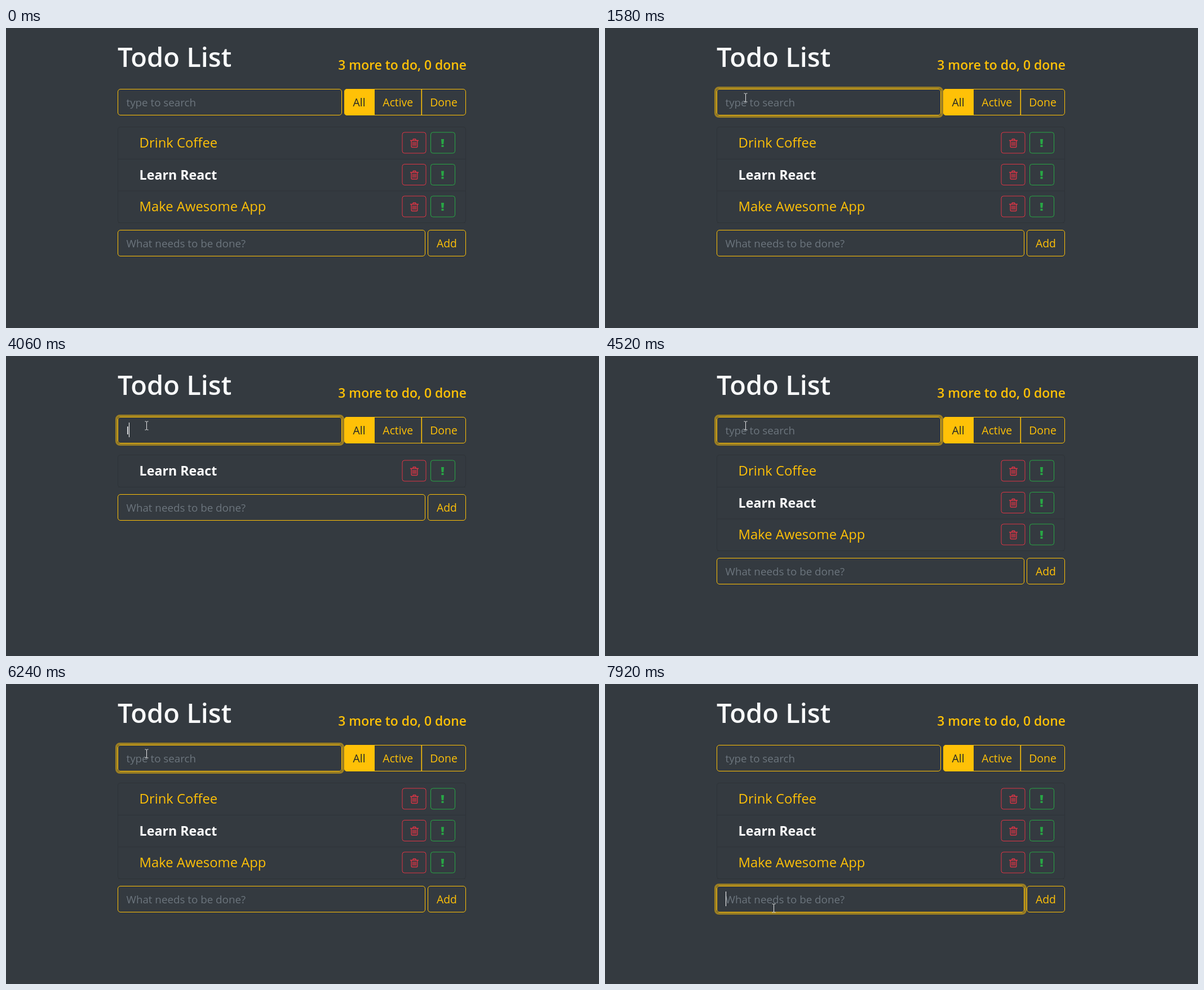
Recreate the animation shown at these times as an HTML page. Size 1052x532 px, loop 7.99 s.

```html
<!DOCTYPE html>
<html lang="en">
<head>
<meta charset="utf-8">
<title>Todo List</title>
<style>
html, body { margin: 0; width: 100%; height: 100%; overflow: hidden; background: #343a40; }
svg { display: block; width: 1052px; height: 532px; font: 18.8px "Open Sans", "Noto Sans", sans-serif; }
text { fill: #ffc107; white-space: pre; }
.box { fill: none; stroke: #ffc107; }
.ring { fill: none; stroke: #ffc107; stroke-width: 4; stroke-opacity: .5; }
.line { fill: none; stroke: #2e3338; }
.hint { fill: #6c757d; }
.button { font-size: 19.4px; text-anchor: middle; }
.item { font-size: 23.8px; }
.next { font-size: 23.2px; font-weight: 700; fill: #fff; }
.red { fill: none; stroke: #dc3545; }
.green { fill: none; stroke: #28a745; }
</style>
</head>
<body>
<svg viewBox="0 0 1052 532">
  <text x="198" y="69" style="font-size:47px;font-weight:600;fill:#f8f9fa">Todo List</text>
  <text x="817" y="74" text-anchor="end" style="font-size:22.9px;font-weight:600">3 more to do, 0 done</text>

  <rect id="searchRing" class="ring" x="196" y="106" width="402" height="51" rx="6"/>
  <rect class="box" x="198.5" y="108.5" width="397" height="46" rx="4.5"/>
  <rect id="blueBorder" class="box" style="stroke:#80bdff" x="198.5" y="108.5" width="397" height="46" rx="4.5"/>
  <text id="searchHint" class="hint" x="213.5" y="139">type to search</text>
  <text id="typed" x="213.5" y="139" style="fill:#fff"></text>

  <path d="M654 108H605a5 5 0 0 0-5 5V150a5 5 0 0 0 5 5H654Z" fill="#ffc107"/>
  <rect class="box" x="600.5" y="108.5" width="215" height="46" rx="4.5"/>
  <path class="box" d="M737.3 108V155" stroke-width="1.6"/>
  <text class="button" x="626.5" y="139" style="fill:#212529">All</text>
  <text class="button" x="695.3" y="139">Active</text>
  <text class="button" x="776.5" y="139">Done</text>

  <rect id="frame" class="line" x="198.5" y="175.5" width="617" rx="4.5"/>
  <g id="rows"></g>

  <g id="adder">
    <rect id="addRing" class="ring" x="196" y="356" width="550" height="51" rx="6"/>
    <rect class="box" x="198.5" y="358.5" width="545" height="46" rx="4.5"/>
    <text class="hint" x="213.5" y="389">What needs to be done?</text>
    <rect class="box" x="748.5" y="358.5" width="67" height="46" rx="4.5"/>
    <text class="button" x="782" y="389">Add</text>
  </g>

  <rect id="caret" width="1" height="26" fill="#fff"/>
  <path id="arrow" d="M.5 .5V16L4.2 12.6 6.7 18.3 9.2 17.2 6.8 11.7H11.6Z" fill="#fff" stroke="#000" stroke-width=".9"/>
  <path id="beam" d="M-3 -7.5H-1L0 -6.5 1 -7.5H3M0 -6.5V6.5M-3 7.5H-1L0 6.5 1 7.5H3" fill="none" stroke="#e4e5e6"/>
</svg>
<script>
const $ = id => document.getElementById(id);
const LOOP = 7990, ROW = 56.5, TICK = 67;
const items = ['Drink Coffee', 'Learn React', 'Make Awesome App'];

// [time, search text]
const typing = [[0, ''], [2190, 'l'], [2330, 'le'], [2980, 'lea'], [3790, 'le'], [3970, 'l'],
  [4130, ''], [5250, 'd'], [5440, 'dr'], [6040, 'd'], [6240, '']];
// the caret turns on and off in turn
const blinks = [1050, 1580, 2130, 2850, 2980, 3520, 4060, 4520, 5050, 5970, 6500, 7040, 7580];
// [start, steps, from, to]
const moves = [
  [390, 5, [599, 467], [209, 142]],
  [850, 4, [209, 142], [249, 123]],
  [6910, 4, [249, 123], [259, 486]],
  [7240, 6, [259, 486], [299, 397]]
];

$('rows').innerHTML = items.map((name, i) => `<g>
  <path class="line" d="M199 232.5H815"/>
  <text class="item ${i === 1 ? 'next' : ''}" x="236.6" y="212">${name}</text>
  <rect class="red" x="703" y="185" width="42" height="37" rx="4"/>
  <path class="red" stroke-width="1.4" d="M717 199.5H732M721.5 199.5L722.5 197H726.5L727.5 199.5
    M719.2 199.5V210.2Q719.2 211.5 720.5 211.5H728.5Q729.8 211.5 729.8 210.2V199.5
    M722 202V209M724.5 202V209M727 202V209"/>
  <rect class="green" x="753.5" y="185" width="43" height="37" rx="4"/>
  <path fill="#28a745" d="M772 197H777L776.3 206H772.7ZM772.5 207.5H776.5V211H772.5Z"/></g>`).join('');
const rows = [...$('rows').children];

const last = (list, t) => list.filter(entry => entry[0] <= t).pop();
const fade = (t, start) => Math.max(0, Math.min(1, (t - start) / 140));
const show = (el, on) => el.setAttribute('visibility', on ? 'visible' : 'hidden');
const place = (el, x, y) => el.setAttribute('transform', `translate(${x} ${y})`);

function drawList(text) {
  const shown = items.map(name => name.toLowerCase().includes(text));
  let count = 0;
  rows.forEach((row, i) => {
    show(row, shown[i]);
    if (shown[i]) place(row, 0, count++ * ROW);
  });
  $('frame').setAttribute('height', count * ROW + .5);
  place($('adder'), 0, (count - items.length) * ROW);
}

function drawCursor(t) {
  const move = last(moves, t);
  show($('arrow'), false);
  show($('beam'), false);
  if (!move) return;
  const [start, steps, from, to] = move;
  const first = start === 390;
  const step = Math.floor((t - start) / TICK) + (first ? 0 : 1);
  const p = Math.min(1, step / (first ? steps - 1 : steps));
  const [x, y] = from.map((a, i) => Math.round(a + (to[i] - a) * p));
  const overSearch = x > 198 && x < 596 && y > 108 && y < 155;
  const overAdd = x > 198 && x < 744 && y > 358 && y < 405;
  const el = $(overSearch || overAdd ? 'beam' : 'arrow');
  const shift = el.id === 'beam' ? .5 : 0;
  place(el, x + shift, y + shift);
  show(el, true);
}

function draw(t) {
  const text = last(typing, t)[1];
  $('typed').textContent = text;
  show($('searchHint'), !text);
  drawList(text);

  const leaving = fade(t, 7780);
  $('searchRing').setAttribute('opacity', fade(t, 1040) * (1 - leaving));
  $('blueBorder').setAttribute('opacity', fade(t, 6910) * (1 - leaving));
  $('addRing').setAttribute('opacity', leaving);

  const width = text ? $('typed').getComputedTextLength() : .3;
  $('caret').setAttribute('x', Math.floor(213.75 + width));
  $('caret').setAttribute('y', t < 7780 ? 118 : 368);
  show($('caret'), blinks.filter(time => time <= t).length % 2);
  drawCursor(t);
}

const begin = performance.now();
(function tick() {
  draw((performance.now() - begin) % LOOP);
  requestAnimationFrame(tick);
})();
</script>
</body>
</html>
```
